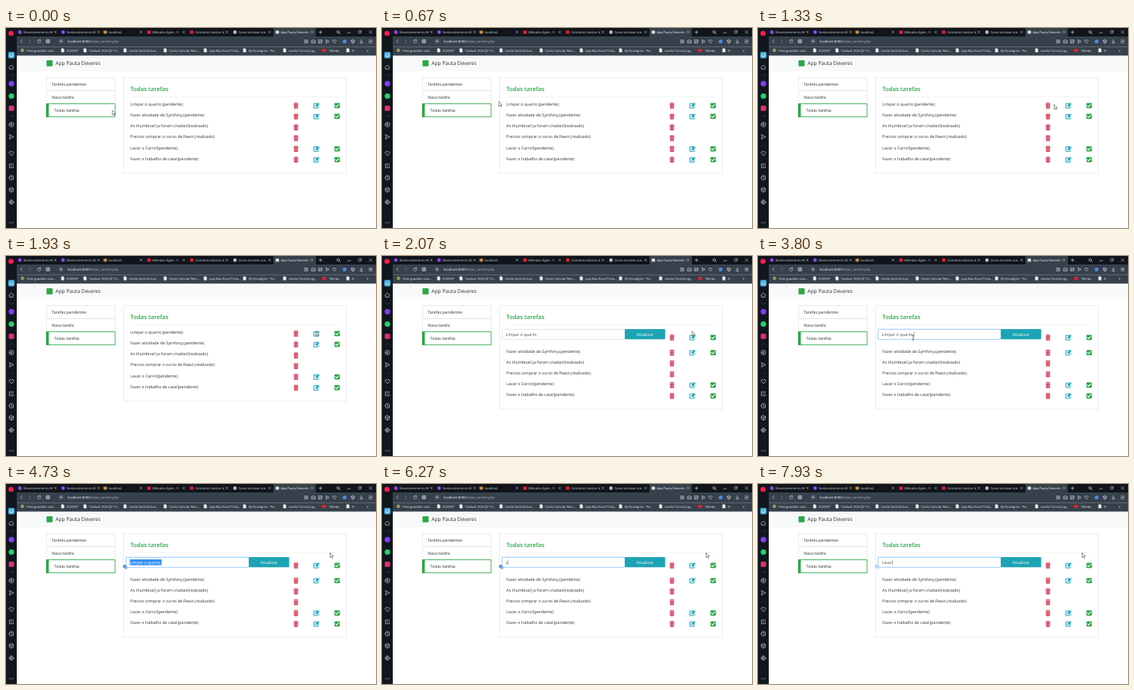
Animation, 480 px wide and 260 px high, one loop 8000 ms. Source, as an HTML page:

```html
<!DOCTYPE html>
<html lang="pt-BR">
<head>
<meta charset="utf-8">
<title>Todas tarefas</title>
<style>
html, body { margin: 0; width: 100%; height: 100%; overflow: hidden; background: #fff; }
svg { display: block; width: 480px; height: 260px; }
text { font-family: "Open Sans", "Noto Sans", sans-serif; text-rendering: geometricPrecision; white-space: pre; }
</style>
</head>
<body>
<svg id="stage" viewBox="0 0 480 260" xmlns="http://www.w3.org/2000/svg"></svg>
<script>
const LOOP = 8000;
const GREEN = '#28a745', RED = '#d3304f', TEAL = '#1da4b4', INK = '#2b2f33', PALE = '#c9ccd3', SLATE = '#36414c';
const FORM_AT = 2070, FOCUS_AT = 3400, DRAG_AT = 3870, DROP_AT = 4270, TYPE_AT = 6270;
const BLINK = 530;
const ROW = 14.06;

const rect = (x, y, w, h, fill, more = '') =>
  `<rect x="${x}" y="${y}" width="${w}" height="${h}" fill="${fill}" ${more}/>`;
const dot = (x, y, r, fill) => `<circle cx="${x}" cy="${y}" r="${r}" fill="${fill}"/>`;
const label = (x, y, size, fill, str, more = '') =>
  `<text x="${x}" y="${y}" font-size="${size}" fill="${fill}" ${more}>${str}</text>`;
const line = (d, color = PALE, w = 0.7) =>
  `<path d="${d}" fill="none" stroke="${color}" stroke-width="${w}" stroke-linecap="round" stroke-linejoin="round"/>`;
const at = (x, y, inner) => `<g transform="translate(${x} ${y})">${inner}</g>`;
const ring = r => `M${-r} 0a${r} ${r} 0 1 0 ${2 * r} 0a${r} ${r} 0 1 0 ${-2 * r} 0`;
const cross = (x, y, r, color = PALE) =>
  at(x, y, line(`M${-r} ${-r}L${r} ${r}M${r} ${-r}L${-r} ${r}`, color, 0.6));
const page = (x, y) => at(x, y, '<path d="M-1.9-2.6H.8L2-1.3V2.6H-1.9Z" fill="#eceef1"/>');

function tabs() {
  const items = [
    [18, 'dot', '#9147ff', 'Desenvolvimento W', 64],
    [74, 'dot', '#9147ff', 'Desenvolvimento W', 120],
    [128.7, 'box', '#c98a4a', 'localhost', 175],
    [185.5, 'box', '#f0202c', 'Métodos Ágeis - V', 230.5],
    [241, 'box', '#f0202c', 'Conceitos básicos d', 286.5],
    [297, 'dot', '#b9bdc6', 'Como escrever um', 342],
    [352, 'box', '#d9dce2', 'App Pauta Deveres', 397]
  ];
  let s = rect(0, 0, 480, 11, '#10151c') + rect(347, 0, 55, 11, SLATE);
  items.forEach(([x, kind, color, str, close], i) => {
    s += kind === 'dot' ? dot(x, 5.4, 2.3, color) : rect(x - 2.2, 3.4, 4.4, 4, color);
    s += label(x + 4.4, 6.8, 4.1, i === 6 ? '#fff' : '#d3d6dc', str) + cross(close, 5.3, 1.2);
    if (i < 5) s += rect(close + 4.6, 3, 0.3, 5, '#343946');
  });
  return s + at(408, 5.4, line('M-2 0H2M0-2V2')) +
    at(431, 5, line(ring(1.6) + 'M1.2 1.2L2.6 2.6')) +
    at(445, 6, line('M-2 0H2')) +
    at(459, 5.3, line('M-1.6-1.1H1.1V1.6H-1.6ZM-.7-2H2V.8', PALE, 0.5)) + cross(473, 5.4, 1.8);
}

function toolbar() {
  const frame = 'M-1.9-1.9H1.9V1.9H-1.9Z';
  let s = rect(0, 11, 480, 13.3, SLATE);
  s += at(20, 17.3, line('M1-2L-1 0L1 2')) + at(31, 17.3, line('M-1-2L1 0L-1 2', '#7f8792'));
  s += at(43, 17.3, line('M1.5-1.4A2.1 2.1 0 1 0 2.1 .3M1.8-2.4V-1.1H.5'));
  s += at(54.5, 17.3, line('M-2-2H2V2H-2ZM0-2V2M-2 0H2', PALE, 0.8));
  s += at(71.5, 17.3, line(ring(2) + 'M-2 0H2M0-2Q-1.6 0 0 2Q1.6 0 0-2', '#a4a9b4', 0.5));
  s += label(80, 18.9, 4.26, '#fff', 'localhost:8000<tspan fill="#b3b9c1">/todas_tarefas.php</tspan>');
  s += at(389.5, 17.5, line(frame + 'M-.8 0H.8M0-.8V.8'));
  s += at(398.8, 17.5, line('M-2.2-1.3H-.8L-.3-2H.6L1-1.3H2.3V1.9H-2.2Z' + 'M-.7.3H.8'));
  s += at(408, 17.5, line(frame + 'M-1.9 .9L1.9-.6'));
  s += at(417, 17.5, line('M-2-2L2.2 0L-2 2L-1.2 0Z'));
  s += at(426, 17.5, line('M0 2L-2-.2A1.1 1.1 0 0 1 0-1.3A1.1 1.1 0 0 1 2-.2Z'));
  s += rect(433.2, 13.5, 0.3, 8, '#5d6772') + dot(439.3, 17.4, 2.5, '#4c8df0');
  s += at(450, 17.5, line('M0-2.3L2-1.2V1.2L0 2.3L-2 1.2V-1.2ZM-2-1.2L0 0L2-1.2M0 0V2.3'));
  s += at(461, 17.5, line('M0-2.3V.8M-1.2-.4L0 .8L1.2-.4M-2 2.1H2'));
  return s + at(473, 17.5, line('M-2-1.7H2M-2 0H2M-2 1.7H2'));
}

function bookmarks() {
  const items = [
    [73.5, 'ZUNTAP'], [102.5, 'Traduzir VLM QX T5...'], [154.5, 'Lenda Vasta Extras...'],
    [206.5, 'Como Calcular Resc...'], [258.5, 'Loja Boa Hora! Tinta...'], [309.5, '(9) Nuvalgrim - Pe...'],
    [361.5, 'Lenda Circuito Jog...'], [443.5, 'N']
  ];
  let s = rect(0, 24.3, 480, 11.5, SLATE);
  s += dot(21.2, 29, 2.3, '#8fa05c') + label(27, 30.5, 4, '#eceef1', 'Free guardian rota...');
  for (const [x, str] of items) s += page(x, 29) + label(x + 5, 30.5, 4, '#eceef1', str);
  return s + rect(410.4, 27.1, 4.8, 3.8, '#f0202c') + label(419, 30.5, 4, '#eceef1', 'Telinka') +
    label(468, 30.5, 5, '#eceef1', '»');
}

function dock() {
  const shapes = [
    [51, 'M-2.7-.6L0-2.8L2.7-.6L1.8 2.5H-1.8Z'],
    [125.5, ring(3) + ring(1.1)],
    [141.5, 'M-2.5-2.7L3 0L-2.5 2.7L-1.5 0Z'],
    [163, 'M0 2.7L-2.8-.2A1.5 1.5 0 0 1 0-1.6A1.5 1.5 0 0 1 2.8-.2Z'],
    [179, 'M1-2.3H-2.6V2.6H2.4V.4M-.8.8L2.8-2.6'],
    [194.7, ring(2.9) + 'M0-1.6V.2L1.3 1'],
    [210.4, 'M0-3L2.7-1.5V1.5L0 3L-2.7 1.5V-1.5ZM-2.7-1.5L0 0L2.7-1.5M0 0V3'],
    [226.3, ring(2.5) + ring(1) + 'M0-3.1V-2.5M0 2.5V3.1M-3.1 0H-2.5M2.5 0H3.1']
  ];
  let s = rect(0, 0, 14, 260, '#12171e') + dot(6.5, 7, 3.3, '#fa1e4e');
  s += rect(2.8, 31, 8.4, 8.4, '#35a7dc', 'rx="1.6"');
  s += at(7, 35.3, line('M-2.4 0L0-2.2L2.4 0M-1.6 0V2.2H1.6V0', '#fff'));
  s += dot(7, 72.3, 3.6, '#7d3ff2') + dot(7, 88.5, 3.6, '#25d366');
  s += rect(3.6, 101, 6.8, 6.8, '#e1306c', 'rx="1.4"');
  for (const y of [61.5, 114.5, 152.3]) s += rect(4, y, 6, 0.4, '#4a4f5b');
  for (const [y, d] of shapes) s += at(7, y, line(d));
  return s + [-2.2, 0, 2.2].map(x => dot(7 + x, 253, 0.6, PALE)).join('');
}

function menu() {
  const edge = 'stroke="#d9dcdf" stroke-width=".6"';
  let s = rect(14, 35.8, 466, 224.2, '#fff') + rect(14, 35.8, 466, 20.2, '#f8f9fa');
  s += rect(52.6, 42, 7.8, 7.8, GREEN) + label(64.3, 48, 6.63, INK, 'App Pauta Deveres');
  s += rect(52.5, 64.5, 89, 17, '#fff', edge) + rect(52.5, 81.5, 89, 17, '#fff', edge);
  s += rect(52.5, 98.5, 89, 17, '#fff', `stroke="${GREEN}" stroke-width=".8"`);
  s += rect(52, 98.2, 3.5, 17.6, GREEN);
  return s + label(59.2, 75, 5.3, INK, 'Tarefas pendentes') +
    label(59.2, 92.2, 5.3, INK, 'Nova tarefa') + label(62.4, 109.2, 5.3, INK, 'Todas tarefas');
}

const trash = '<path d="M-3.1-3.3H-1.2L-.8-3.9H.8L1.2-3.3H3.1V-2.4H-3.1ZM-2.7-1.9H2.7L2.4 3.9H-2.4Z" fill="' + RED + '"/>' +
  line('M-1.2-.8V2.8M0-.8V2.8M1.2-.8V2.8', '#fff', 0.35);
const pencil = line('M.9-2.6H-3.3V3.2H2.3V.7', TEAL, 1) +
  '<path d="M-1.4 1.5L-1.1-.4L2.3-3.8L4.2-1.9L.7 1.3Z" fill="' + TEAL + '"/>' +
  line('M1.4-2.9L3.3-1', '#fff', 0.35);
const tick = rect(-3.4, -3.4, 6.8, 6.8, GREEN, 'rx=".8"') + line('M-2 .1L-.6 1.5L2.1-1.4', '#fff', 1.1);

const tasks = [
  ['Limpar o quarto.', 1], ['Fazer atividade de Symfony.', 1], ['As thumbnail ja foram criadas!', 0],
  ['Preciso comprar o curso de React.', 0], ['Lavar o Carro!', 1], ['Fazer o trabalho de casa!', 1]
];

function task([str, open], i) {
  const y = 99.5 + i * ROW;
  const icons = at(376.2, y + 1.4, trash) +
    (open ? at(402.7, y + 1.4, pencil) + at(429.6, y + 1.4, tick) : '');
  const words = label(161.3, y + 1.8, 5.3, INK, `${str}(${open ? 'pendente' : 'realizado'})`);
  return i ? words + icons : `<g id="firstText">${words}</g><g id="firstIcons">${icons}</g>`;
}

const form = `<g id="form">
  <rect id="glow" x="155" y="94.6" width="160.4" height="14.4" rx="1.8" fill="#007bff" fill-opacity=".2"/>
  ${rect(155.8, 95.4, 159.4, 12.9, '#fff', 'id="field" rx="1.2" stroke-width=".6"')}
  ${rect(315, 95, 52.4, 13.3, TEAL, 'rx="1.2"')}
  ${label(341.2, 103.7, 5.3, '#fff', 'Atualizar', 'text-anchor="middle"')}
  ${rect(160.5, 98, 0, 7.6, '#3390f5', 'id="mark"')}
  ${label(160.5, 103.7, 5.3, '#495057', '', 'id="value"')}
  ${rect(0, 98.3, 0.4, 7, '#333', 'id="caret"')}
  <g id="popup">${rect(152.1, 105.3, 3.6, 3.6, '#3f7fe0', 'rx=".5"')}
  ${rect(153.9, 107, 3.4, 3.6, '#7fa9ec', 'rx=".5"')}</g></g>`;

document.getElementById('stage').innerHTML =
  menu() +
  rect(152.5, 64.5, 289, 123.9, '#fff', 'id="panel" stroke="#dee2e6" stroke-width=".6"') +
  label(161.2, 81.7, 7.7, GREEN, 'Todas tarefas', 'font-weight="600"') +
  rect(161.2, 89.4, 271.6, 0.4, '#dfe0e2') +
  task(tasks[0], 0) +
  `<g id="others">${tasks.slice(1).map((t, i) => task(t, i + 1)).join('')}</g>` +
  form + tabs() + toolbar() + bookmarks() + dock() +
  '<path id="arrow" d="M0 0V6L1.4 4.8L2.4 7L3.4 6.5L2.4 4.5H4.3Z" fill="#fff" stroke="#222" stroke-width=".5"/>' +
  '<path id="beam" d="M-1.2-3H1.2M0-3V3M-1.2 3H1.2" fill="none" stroke="#222" stroke-width=".6"/>';

const el = {};
document.querySelectorAll('[id]').forEach(n => { el[n.id] = n; });
const show = (node, on) => node.setAttribute('visibility', on ? 'inherit' : 'hidden');
const place = (node, x, y) => node.setAttribute('transform', `translate(${x} ${y})`);

// Pointer stops: time, x, y
const stops = [
  [0, 138, 107], [330, 89, 100], [560, 130, 92], [870, 204, 104], [1330, 384.1, 99.4],
  [1730, 402.2, 97.8], [2330, 402.2, 97.8], [2800, 213, 101], [3000, 213, 101], [3400, 204, 104],
  [3800, 201.2, 106], [DRAG_AT, 201.2, 106], [4200, 139, 105], [DROP_AT, 139, 105],
  [4460, 290, 86], [4730, 420.5, 89.5], [LOOP, 420.5, 89.5]
];

function pointer(t) {
  const i = stops.findIndex(s => s[0] > t);
  const [t0, x0, y0] = stops[i - 1], [t1, x1, y1] = stops[i];
  const k = (t - t0) / (t1 - t0), e = k * k * (3 - 2 * k);
  return [x0 + (x1 - x0) * e, y0 + (y1 - y0) * e];
}

const keys = [TYPE_AT, 7200, 7400, 7600, 7800];

function draw(t) {
  const editing = t >= FORM_AT, focused = t >= FOCUS_AT;
  const drop = editing ? 10.6 : 0;
  el.panel.setAttribute('height', 123.9 + drop);
  place(el.others, 0, drop);
  place(el.firstIcons, 0, editing ? 5 : 0);
  show(el.firstText, !editing);
  show(el.form, editing);
  show(el.glow, focused);
  el.field.setAttribute('stroke', focused ? '#80bdff' : '#ced4da');

  const typed = keys.filter(k => k <= t);
  el.value.textContent = typed.length ? 'Lavar'.slice(0, typed.length) : tasks[0][0];
  const end = 160.5 + el.value.getComputedTextLength();

  const [x, y] = pointer(t);
  const dragging = t >= DRAG_AT && t < DROP_AT;
  const marked = t >= DRAG_AT && !typed.length;
  const from = dragging ? Math.min(end, Math.max(160.5, x)) : 160.5;
  show(el.mark, marked);
  el.mark.setAttribute('x', from);
  el.mark.setAttribute('width', Math.max(0, end - from));
  el.value.setAttribute('fill', marked && from < 165 ? '#fff' : '#495057');

  const since = t - (typed.length ? typed[typed.length - 1] : FOCUS_AT);
  show(el.caret, focused && !marked && Math.floor(since / BLINK) % 2 === 0);
  el.caret.setAttribute('x', end + 0.3);

  show(el.popup, t >= DROP_AT + 130);
  el.popup.setAttribute('opacity', 1 - 0.65 * Math.min(1, Math.max(0, (t - 7200) / 730)));

  const inField = editing && x > 155.5 && x < 315 && y > 95.4 && y < 108.7;
  const beam = inField || dragging;
  show(el.beam, beam);
  show(el.arrow, !beam);
  place(beam ? el.beam : el.arrow, x, y);
}

function tickFrame() {
  draw(performance.now() % LOOP);
  requestAnimationFrame(tickFrame);
}
tickFrame();
</script>
</body>
</html>
```
